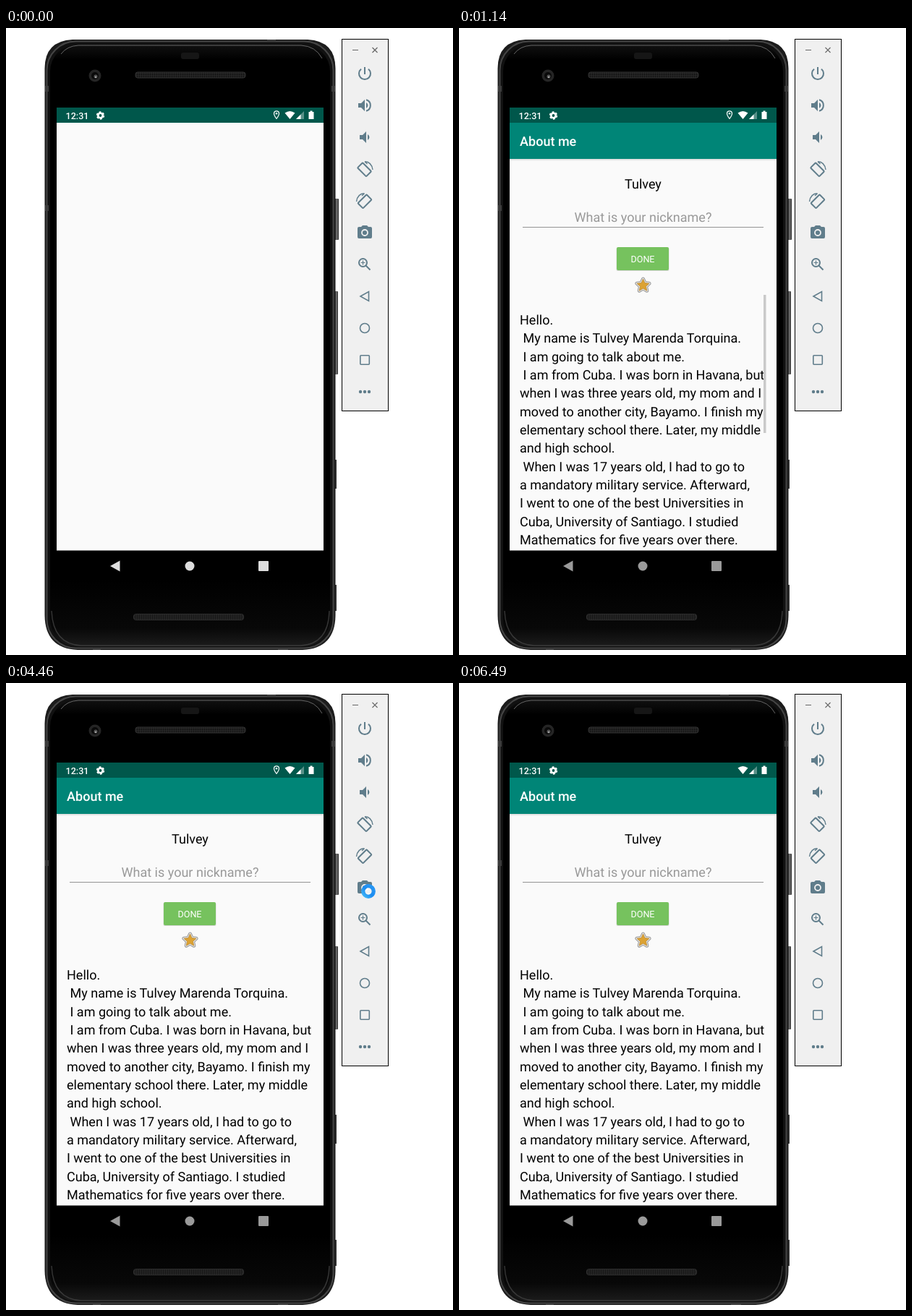
Animation, 618 px wide and 867 px high, one loop 8000 ms. Source, as an HTML page:

```html
<!DOCTYPE html>
<html lang="en">
<head>
<meta charset="utf-8">
<title>About me</title>
<style>
  html, body { margin: 0; width: 100%; height: 100%; overflow: hidden; background: #fff; }
  svg { display: block; width: 618px; height: 867px; }
  text { font-family: Roboto, sans-serif; font-size: 18.03px; white-space: pre; text-rendering: geometricPrecision; }
  .small { font-size: 12.6px; }
  .mid { text-anchor: middle; }
  .line { fill: none; stroke: #607d8b; stroke-width: 2; }
  .thin { stroke-width: 1.6; }
  .solid { fill: #607d8b; }
</style>
</head>
<body>
<svg viewBox="0 0 618 867">
  <defs>
    <linearGradient id="glass" x2="0" y2="1">
      <stop offset="0" stop-color="#111"/><stop offset=".025" stop-color="#000"/>
      <stop offset=".89" stop-color="#000"/><stop offset=".97" stop-color="#080808"/>
      <stop offset="1" stop-color="#1c1c1c"/>
    </linearGradient>
    <linearGradient id="shade" x2="0" y2="1">
      <stop offset="0" stop-color="#000" stop-opacity=".14"/><stop offset="1" stop-color="#000" stop-opacity="0"/>
    </linearGradient>
    <linearGradient id="side">
      <stop offset="0" stop-color="#222"/><stop offset=".6" stop-color="#777"/><stop offset="1" stop-color="#222"/>
    </linearGradient>
    <linearGradient id="busy" x1="0" y1="1" x2="1" y2="0">
      <stop offset="0" stop-color="#42b8f8"/><stop offset=".45" stop-color="#1d8cf0"/><stop offset="1" stop-color="#2798f5"/>
    </linearGradient>
    <pattern id="mesh" width="3" height="3" patternUnits="userSpaceOnUse">
      <rect width="3" height="3" fill="#262626"/><circle cx="1.5" cy="1.5" r="1" fill="#101010"/>
    </pattern>
  </defs>

  <!-- phone body -->
  <g fill="url(#side)">
    <rect x="454" y="236" width="6" height="57" rx="1"/>
    <rect x="454" y="364" width="5" height="115" rx="1"/>
    <rect x="454" y="597" width="3" height="40" fill="#333"/>
    <rect x="454" y="770" width="3" height="36" fill="#333"/>
  </g>
  <path d="M92 16H417Q455.500 18 455.500 56V812Q455 858 410 860H99Q54 858 53.500 812V56Q53.500 18 92 16Z" fill="#1c1c1c"/>
  <rect x="56.500" y="18.500" width="396" height="839" rx="40" fill="#111" stroke="#454545" stroke-width="2"/>
  <rect x="61" y="23" width="387" height="832" rx="37" fill="url(#glass)"/>
  <path d="M76 36Q84 25 100 24H408Q428 25 437 42" fill="none" stroke="#666"/>
  <path d="M63 806Q65 852 104 854H407Q446 852 447 806" fill="none" stroke="#484848" stroke-width="1.5" opacity=".7"/>
  <g fill="#3c3c3c">
    <rect x="54" y="80" width="5" height="8"/><rect x="54" y="245" width="5" height="8"/>
    <rect x="450" y="80" width="5" height="8"/><rect x="361" y="16" width="12" height="3"/>
    <rect x="120" y="857" width="11" height="3"/><rect x="376" y="857" width="14" height="3"/>
  </g>
  <rect x="242" y="34" width="25" height="9" rx="3" fill="#161616"/>
  <circle cx="123" cy="66" r="8.5" fill="#252525"/>
  <circle cx="123" cy="66" r="5" fill="#0a0a0a"/>
  <circle cx="124" cy="67" r="2.5" fill="#555"/><circle cx="124" cy="68" r="1" fill="#bbb"/>
  <g fill="url(#mesh)" stroke="#333">
    <rect x="179" y="61" width="152" height="8" rx="3"/>
    <rect x="176.5" y="810.5" width="152" height="8" rx="3"/>
  </g>

  <!-- screen -->
  <rect x="70" y="131" width="369" height="591.5" fill="#fafafa"/>
  <g id="page" opacity="0">
    <rect x="70" y="181" width="369" height="3" fill="url(#shade)"/>
    <rect x="70" y="131" width="369" height="50" fill="#008577"/>
    <text x="84" y="163" fill="#fff" font-weight="500">About me</text>
    <text x="254.5" y="222" class="mid">Tulvey</text>
    <text x="254.5" y="268" class="mid" fill="#999">What is your nickname?</text>
    <path d="M88 275.5H421" stroke="#949494"/>
    <rect x="217.5" y="303.5" width="73" height="32.5" rx="2" fill="#000" opacity=".14"/>
    <rect x="218" y="303" width="72" height="32" rx="2" fill="#76c25e"/>
    <text x="254" y="323.6" class="mid small" fill="#fff">DONE</text>
    <g stroke-linejoin="round">
      <path class="star" fill="#888" stroke="#999" stroke-width="5"/>
      <path class="star" fill="#eee" stroke="#e6e6e6" stroke-width="3"/>
      <path class="star" fill="#dca233" stroke="#b98a37" stroke-width=".8"/>
    </g>
    <g id="story"></g>
    <rect id="scrollbar" x="421" y="369" width="3.5" height="191" fill="#c6c6c6"/>
  </g>

  <!-- status bar -->
  <rect x="70" y="110" width="369" height="21" fill="#00574b"/>
  <g fill="#fff">
    <text x="82.5" y="125.5" class="small" font-weight="500">12:31</text>
    <g fill="none" stroke="#fff">
      <circle cx="130.5" cy="121" r="3.2" stroke-width="2.6"/>
      <circle cx="130.5" cy="121" r="4.8" stroke-width="1.8" stroke-dasharray="2.9 2.126"/>
    </g>
    <g id="pin">
      <path d="M374 125.4Q370.5 121 370.5 118.3A3.5 3.5 0 0 1 377.5 118.3Q377.5 121 374 125.4Z" fill="none" stroke="#fff" stroke-width="1.2"/>
      <circle cx="374" cy="118.3" r="1.3"/>
    </g>
    <path d="M385.5 117.5Q392.5 112.5 399.5 117.5L392.5 126Z"/>
    <path d="M401 126L412 115V126Z" opacity=".35"/>
    <path d="M401 126L407.5 119.5V126Z"/>
    <path d="M418.5 116H420.5V114.5H423.5V116H425.5V126H418.5Z"/>
  </g>

  <!-- navigation bar -->
  <g id="nav">
    <path d="M144 744L157.5 736.5V751.5Z"/>
    <circle cx="254" cy="744" r="6.5"/>
    <rect x="349" y="737" width="14" height="14" rx="1"/>
  </g>

  <!-- emulator controls -->
  <rect x="464.5" y="15.5" width="64" height="514" fill="#f0f0f0" stroke="#000"/>
  <path d="M479 30.5H487M506.5 27L513.5 34M513.5 27L506.5 34" fill="none" stroke="#666" stroke-width="1.2"/>
  <path transform="translate(496 63)" class="line" d="M0 -9V1M-5 -6.2A8 8 0 1 0 5 -6.2"/>
  <g transform="translate(496 107)">
    <path class="solid" d="M-9 -3H-5L0 -8V8L-5 3H-9ZM2 -4A4.5 4.5 0 0 1 2 4Z"/>
    <path class="line" d="M2 -7.7A8 8 0 0 1 2 7.7"/>
  </g>
  <path transform="translate(496 151)" class="solid" d="M-7 -3H-3L2 -8V8L-3 3H-7ZM4 -4A4.5 4.5 0 0 1 4 4Z"/>
  <g id="turn" transform="translate(496 195)" class="line">
    <rect x="-8.5" y="-5" width="17" height="10" rx="1" transform="translate(-.5 .8) rotate(45)"/>
    <path d="M0 -10.3Q9.5 -10 11 1M0 -10.3L3.5 -7" stroke-width="1.4"/>
  </g>
  <use href="#turn" transform="translate(991.5 44) scale(-1 1)"/>
  <g transform="translate(496 283)">
    <path class="solid" d="M-3 -10H3L5 -8H8Q10 -8 10 -6V6Q10 8 8 8H-8Q-10 8 -10 6V-6Q-10 -8 -8 -8H-5Z"/>
    <circle r="4" fill="#607d8b" stroke="#f0f0f0" stroke-width="1.8"/>
  </g>
  <g transform="translate(493.5 324.5)" class="line">
    <circle r="5.5"/><path d="M4 4L10 10"/><path d="M-3 0H3M0 -3V3" stroke-width="1.2"/>
  </g>
  <g class="line thin">
    <path d="M490 371L501.5 364.5V377.5Z"/>
    <circle cx="496" cy="415" r="6.5"/>
    <rect x="489.8" y="452.8" width="12.5" height="12.5" rx="1"/>
  </g>
  <g class="solid"><circle cx="490" cy="503" r="2.2"/><circle cx="496" cy="503" r="2.2"/><circle cx="502" cy="503" r="2.2"/></g>

  <g id="cursor">
    <circle r="5" fill="#fff" opacity=".9"/>
    <circle r="7.3" fill="none" stroke="url(#busy)" stroke-width="5.2"/>
  </g>
</svg>
<script>
const $ = id => document.getElementById(id);
const LOOP = 8000;

const story = [
  'Hello.',
  ' My name is Tulvey Marenda Torquina.',
  ' I am going to talk about me.',
  ' I am from Cuba. I was born in Havana, but',
  'when I was three years old, my mom and I',
  'moved to another city, Bayamo. I finish my',
  'elementary school there. Later, my middle',
  'and high school.',
  ' When I was 17 years old, I had to go to',
  'a mandatory military service. Afterward,',
  'I went to one of the best Universities in',
  'Cuba, University of Santiago. I studied',
  'Mathematics for five years over there.'
];
story.forEach((line, i) => {
  const text = document.createElementNS('http://www.w3.org/2000/svg', 'text');
  text.setAttribute('x', 84);
  text.setAttribute('y', 410 + i * 25.33);
  text.textContent = line;
  $('story').append(text);
});

const starPoints = Array.from({ length: 10 }, (_, i) => {
  const angle = (i / 5 - .5) * Math.PI, radius = i % 2 ? 4.2 : 9;
  return [254.5 + radius * Math.cos(angle), 356 + radius * Math.sin(angle)].map(v => v.toFixed(2));
});
document.querySelectorAll('.star').forEach(s => s.setAttribute('d', 'M' + starPoints.join('L') + 'Z'));

// Step tables: time in ms, then the values held from that time on.
const fade = [[0, 0, 222], [130, .4, 210], [220, .72, 196], [280, .86, 182], [350, .94, 170], [430, .98, 160], [510, 1, 154]];
const scrollFade = [[0, 1], [1140, .9], [1210, .45], [1290, 0]];
const moves = [
  [0], [1830, 462, 582], [1910, 408, 518], [1980, 360, 450], [2060, 329, 394], [2150, 311, 345],
  [2220, 297, 310], [2300, 286, 285], [2380, 279, 268], [2460, 276, 262], [3080, 352, 295], [3160],
  [4460, 501, 288], [4540, 440, 262], [4620, 385, 250], [4700, 340, 248], [4790, 312, 256],
  [4870, 295.5, 263], [5020, 292, 263], [5100, 290, 263],
  [6030, 300, 261], [6110, 340, 257], [6180, 400, 260], [6260, 460, 265], [6340, 520, 269], [6410, 569, 272], [6490]
];
const at = (steps, t) => steps.findLast(step => step[0] <= t);

const start = performance.now();
function draw() {
  const t = (performance.now() - start) % LOOP;
  const [, opacity, grey] = at(fade, t);
  $('page').setAttribute('opacity', opacity);
  $('nav').setAttribute('fill', `rgb(${grey},${grey},${grey})`);
  $('scrollbar').setAttribute('opacity', at(scrollFade, t)[1]);
  $('pin').setAttribute('visibility', t < 5330 ? 'visible' : 'hidden');
  const [, x = -50, y = -50] = at(moves, t);
  $('cursor').setAttribute('transform', `translate(${x} ${y})`);
  requestAnimationFrame(draw);
}
draw();
</script>
</body>
</html>
```
